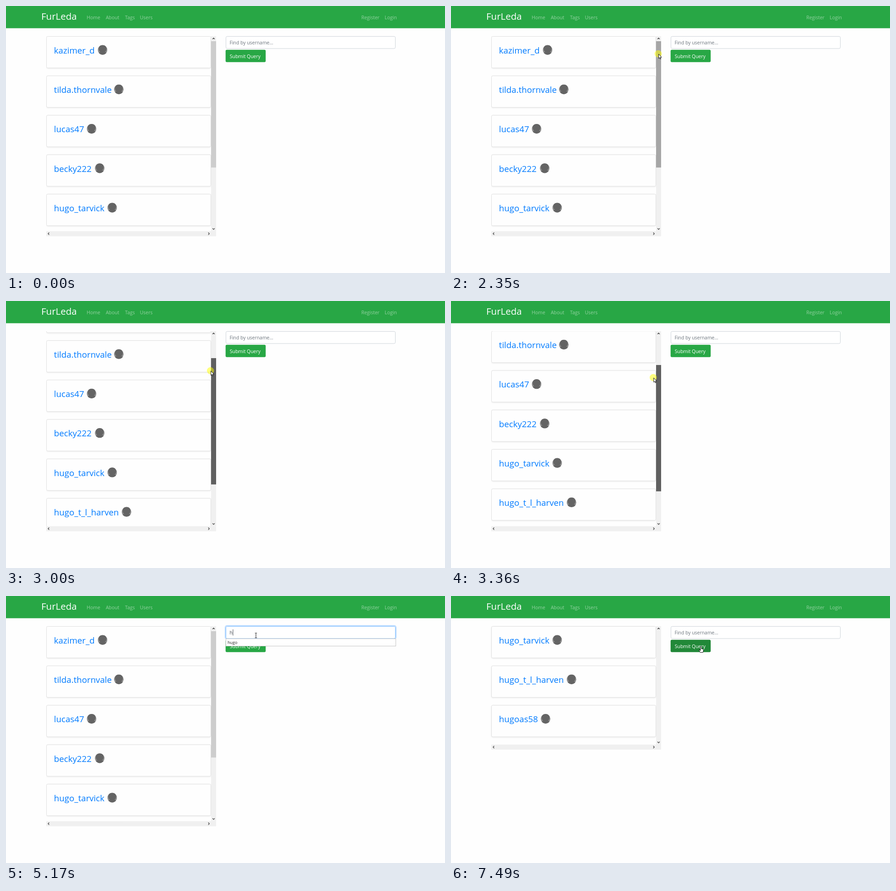
An HTML page for the animation above (8000 ms loop, 959 px wide and 584 px high).

```html
<!DOCTYPE html>
<html lang="en">
<head>
<meta charset="utf-8">
<title>User search</title>
<style>
  html, body { margin: 0; width: 100%; height: 100%; overflow: hidden; background: #fefefe; }
  svg { display: block; width: 959px; height: 584px; font: 10.45px "Open Sans", "Noto Sans", sans-serif; }
  .brand { font-size: 20.5px; fill: #fff; }
  .nav { fill: #fff; fill-opacity: .5; }
  .name { font-size: 18.7px; fill: #007bff; }
  .card { fill: #fefefe; stroke: #dfdfdf; filter: drop-shadow(0 1.4px 1.4px rgba(0, 0, 0, .075)); }
  .track { fill: #f0f0f0; }
  .chevron { fill: none; stroke: #505050; stroke-width: 1.4; }
  .ring { fill: none; stroke-width: 2.2; }
  .cursor path { fill: #fff; stroke: #000; stroke-width: .9; stroke-linejoin: round; }
</style>
</head>
<body>
<svg viewBox="0 0 959 584">
  <defs>
    <clipPath id="view"><rect x="88" y="66" width="360" height="426.5"/></clipPath>
    <clipPath id="disc"><circle r="10.6"/></clipPath>
    <g id="avatar" clip-path="url(#disc)">
      <circle r="10.6" fill="#8e8e8e"/>
      <ellipse cy="-2.5" rx="8.6" ry="9" fill="#646464"/>
      <ellipse cy="9" rx="9.6" ry="5.6" fill="#646464"/>
    </g>
  </defs>

  <rect width="959" height="48.6" fill="#28a745"/>
  <text class="brand" x="77" y="30">FurLeda</text>
  <g class="nav">
    <text x="176.3" y="28.5">Home</text>
    <text x="218" y="28.5">About</text>
    <text x="260" y="28.5">Tags</text>
    <text x="292.5" y="28.5">Users</text>
    <text x="776.3" y="28.5">Register</text>
    <text x="827.3" y="28.5">Login</text>
  </g>

  <g id="before">
    <g clip-path="url(#view)"><g id="allUsers"></g></g>
  </g>
  <g id="after">
    <rect x="86" y="64" width="374" height="442" fill="#fefefe"/>
    <g id="found"></g>
  </g>

  <rect id="inputRing" class="ring" x="478.9" y="64.9" width="373.2" height="29.2" rx="4" stroke="#007bff" stroke-opacity=".25"/>
  <rect id="input" x="480.5" y="66.5" width="370" height="26.5" rx="2.7" fill="#fff" stroke="#ced4da"/>
  <text id="hint" x="488.5" y="84" fill="#6c757d">Find by username...</text>
  <text id="typed" x="488.5" y="84" fill="#495057"></text>
  <rect id="caret" y="73" width="1" height="13.5" fill="#495057"/>

  <rect id="buttonRing" class="ring" x="478.7" y="94.7" width="89.6" height="29.2" rx="4" stroke="#48b461" stroke-opacity=".5"/>
  <rect id="button" x="479.7" y="95.7" width="87.6" height="27" rx="2.75"/>
  <text x="488.8" y="114" fill="#fff">Submit Query</text>

  <g id="popup">
    <rect x="480.5" y="93.5" width="371" height="16" fill="#fff" stroke="#c4c4c4"/>
    <text x="484" y="104.6" font-size="9" fill="#222">hugo</text>
  </g>

  <g id="pointer">
    <circle id="halo" cx="-1" cy="-.5" r="7.8" fill="#ff0" fill-opacity=".5"/>
    <g class="cursor">
      <path id="arrow" d="M0 0V9.6L2.1 7.7 3.6 11 5 10.4 3.6 7.2H6.5Z"/>
      <path id="hand" d="M-1.1 .9a1.1 1.1 0 0 1 2.2 0V4.8L4.2 5.5Q5.4 5.9 5.4 7.2V9.6L4.4 13H-1.4L-4.2 8.6Q-4.7 7-3.2 7.4L-1.1 9Z"/>
      <path id="beam" style="fill:none" d="M-2.2-5H-.7L0-4.4.7-5H2.2M0-4.4V4.9M-2.2 5.5H-.7L0 4.9.7 5.5H2.2"/>
    </g>
  </g>
</svg>

<script>
const LOOP = 8000;
const el = Object.fromEntries([...document.querySelectorAll('svg [id]')].map(n => [n.id, n]));

// [user name, avatar centre]
const users = [
  ['kazimer_d', 211], ['tilda.thornvale', 246.5], ['lucas47', 187], ['becky222', 204.7],
  ['hugo_tarvick', 232], ['hugo_t_l_harven', 263.3], ['hugoas58', 206.6]
];

// Pointer path: [ms, x, y, easing]
const path = [
  [200, 899, 590], [490, 856, 229, 'out'], [880, 856, 229], [1700, 608, 84], [2200, 453.6, 105],
  [2390, 453.6, 105], [2720, 451.3, 131, 'line'], [3130, 446, 163, 'line'], [3360, 442.8, 168, 'line'],
  [3510, 442.8, 168], [4020, 451, 82.8], [4300, 543, 86], [4560, 546, 86],
  [6430, 546, 86], [6470, 546, 89.5, 'line'], [6800, 546, 110.5]
];
const ease = { line: p => p, out: p => p * (2 - p), both: p => p * p * (3 - 2 * p) };
const keys = [[5090, 'h'], [5280, 'hu'], [5450, 'hug'], [5730, 'hugo']];

const clamp = (v, a, b) => Math.min(b, Math.max(a, v));
const ramp = (t, a, b) => clamp((t - a) / (b - a), 0, 1);
const between = (v, a, b) => v >= a && v < b;
const show = (node, on) => { node.style.opacity = +on; };

const card = ([name, x], i) => {
  const y = 66.5 + i * 86.25;
  return `<rect class="card" x="88.5" y="${y}" width="359" height="69" rx="2.75"/>
    <text class="name" x="104.8" y="${y + 37.3}">${name}</text>
    <use href="#avatar" x="${x}" y="${y + 29.6}"/>`;
};

const chevron = (x, y, turn) =>
  `<path class="chevron" d="M-2.4 1.2L0-1.2 2.4 1.2" transform="translate(${x} ${y}) rotate(${turn})"/>`;

const bars = (bottom, thumb = '') =>
  `<rect class="track" x="448" y="66" width="11" height="${bottom - 66}"/>
   <rect class="track" x="88" y="${bottom}" width="371" height="11"/>${thumb}` +
  chevron(453.5, 71.3, 0) + chevron(453.5, bottom - 5, 180) +
  chevron(93.2, bottom + 5.5, -90) + chevron(443, bottom + 5.5, 90);

el.allUsers.innerHTML = users.map(card).join('');
el.before.insertAdjacentHTML('beforeend',
  bars(492.5, '<rect id="thumb" x="448" y="77" width="11" height="276.3"/>'));
el.found.innerHTML = users.slice(4).map(card).join('') + bars(325);
el.thumb = document.getElementById('thumb');

function pointerAt(t) {
  const next = path.findIndex(k => k[0] > t);
  if (next < 0) return path[path.length - 1].slice(1, 3);
  if (!next) return path[0].slice(1, 3);
  const a = path[next - 1], b = path[next];
  const p = ease[b[3] || 'both'](ramp(t, a[0], b[0]));
  return [a[1] + (b[1] - a[1]) * p, a[2] + (b[2] - a[2]) * p];
}

function mix(a, b, p) {
  return `rgb(${a.map((v, i) => v + (b[i] - v) * p)})`;
}

function draw(t) {
  const [x, y] = pointerAt(t);
  const dragging = between(t, 2340, 4060);
  const fade = ease.out(ramp(t, 7060, 7490));

  // Scrolling follows the dragged thumb
  const offset = dragging ? clamp(y - 105, 0, 129) : 0;
  const overThumb = between(x, 448, 459) && between(y, 77, 353);
  el.thumb.setAttribute('y', 77 + offset);
  el.thumb.setAttribute('fill', between(t, 2390, 4060) ? '#606060' : overThumb || dragging ? '#a6a6a6' : '#cdcdcd');
  el.allUsers.setAttribute('transform', `translate(0 ${-offset * 1.38})`);
  el.after.style.opacity = fade;

  // Search field
  const focus = ramp(t, 4340, 4540) * (1 - ramp(t, 5950, 6180));
  el.inputRing.style.opacity = focus;
  el.input.setAttribute('stroke', mix([206, 212, 218], [128, 189, 255], focus));
  const text = keys.reduce((s, k) => t >= k[0] ? k[1] : s, '');
  if (el.typed.textContent !== text) el.typed.textContent = text;
  el.typed.style.opacity = 1 - fade;
  el.hint.style.opacity = text ? fade : 1;
  el.caret.setAttribute('x', 489 + (text ? el.typed.getComputedTextLength() : 0));
  show(el.caret, between(t, 4390, 4890) || between(t, 5090, 5950));
  show(el.popup, between(t, 5140, 5960));

  // Button
  const hover = ramp(t, 6570, 6720);
  el.button.setAttribute('fill', mix([40, 167, 69], [33, 136, 56], hover));
  el.buttonRing.style.opacity = ramp(t, 5960, 6280) * (1 - fade);

  // Pointer
  const onInput = !dragging && between(x, 480, 851) && between(y, 66, 93);
  const onButton = between(x, 480, 567) && between(y, 96, 122.5);
  el.pointer.setAttribute('transform', `translate(${x} ${y})`);
  show(el.pointer, t >= 210);
  show(el.halo, dragging || between(t, 4340, 4430));
  show(el.beam, onInput);
  show(el.hand, onButton);
  show(el.arrow, !onInput && !onButton);
}

const start = performance.now();
function tick() {
  draw((performance.now() - start) % LOOP);
  requestAnimationFrame(tick);
}
tick();
</script>
</body>
</html>
```
